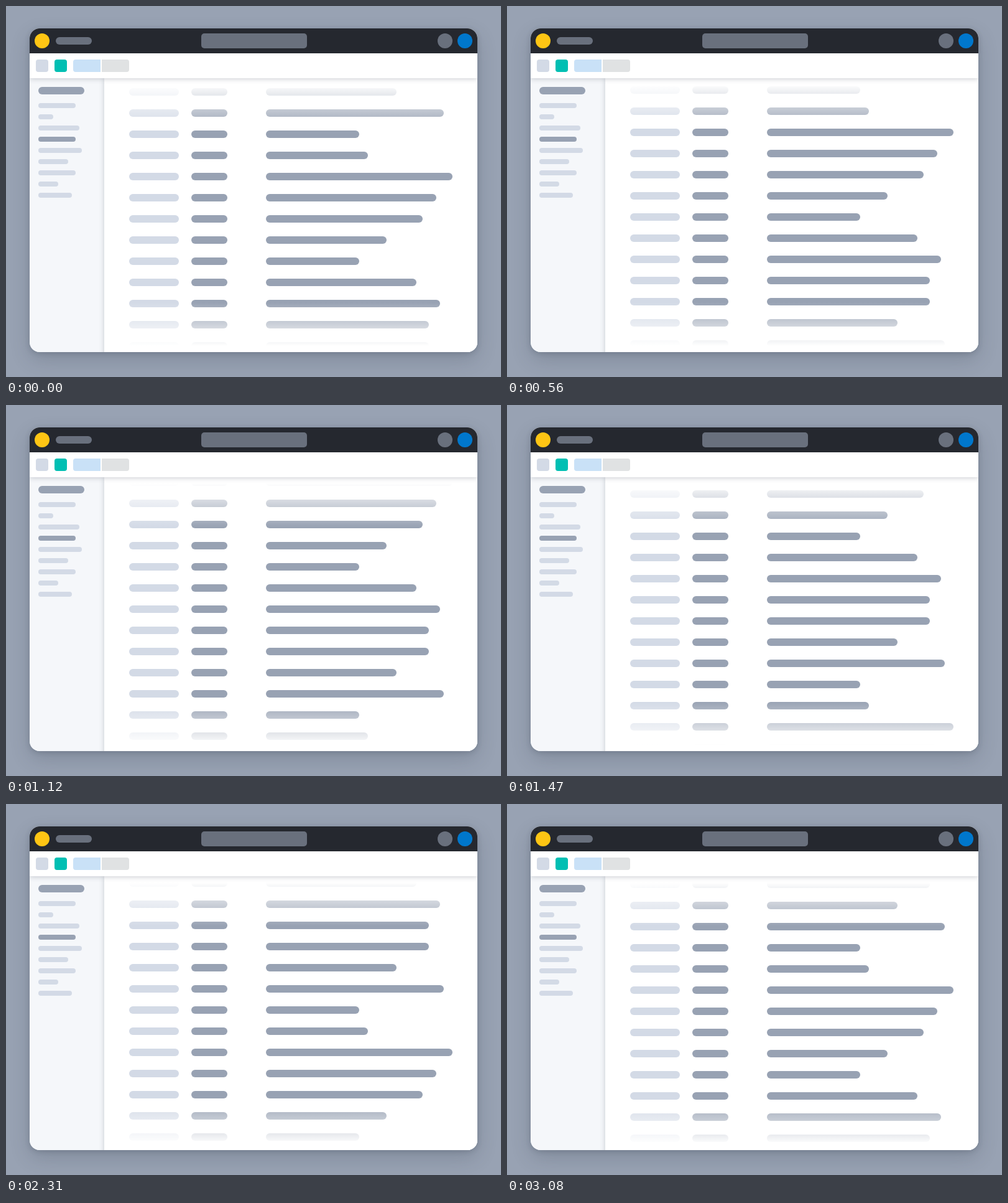
Write an HTML page with a canvas that moves like this. It is 796 by 596 pixels and loops after 3150 ms.

```html
<!DOCTYPE html>
<html lang="en">
<head>
<meta charset="utf-8">
<title>Scrolling log list</title>
<style>
  html, body { margin: 0; width: 100%; height: 100%; overflow: hidden; background: #98a2b3; }
  canvas { display: block; }
</style>
</head>
<body>
<canvas id="stage" width="796" height="596"></canvas>
<script>
const ctx = document.getElementById('stage').getContext('2d');

const LOOP = 3150, STEP = 70;
const ROW_GAP = 34, FIRST_ROW = 132;
const SPEED = 0.1404, RAMP = 107, SCROLL_TIME = 3080;
const ROWS = [210, 286, 150, 164, 300, 274, 252, 194, 150, 242, 280, 262, 262];
const NAV = [60, 24, 66, 60, 70, 48, 60, 32, 54];
const MID = '#98a2b3', LIGHT = '#d3dae6', GREY = '#69707d';

function box(x, y, w, h, r, color) {
  ctx.fillStyle = color;
  ctx.beginPath();
  ctx.roundRect(x, y, w, h, r);
  ctx.fill();
}

const pill = (x, y, w, h, color) => box(x, y, w, h, h / 2, color);
const dot = (x, y, r, color) => pill(x - r, y - r, 2 * r, 2 * r, color);

function shadowed(color, blur, dy, draw) {
  ctx.save();
  ctx.shadowColor = color;
  ctx.shadowBlur = blur;
  ctx.shadowOffsetY = dy;
  draw();
  ctx.restore();
}

// White veil, opaque at y0 and clear at y1
function fade(y0, y1) {
  const g = ctx.createLinearGradient(0, y0, 0, y1);
  g.addColorStop(0, '#fff');
  g.addColorStop(1, 'rgba(255,255,255,0)');
  ctx.fillStyle = g;
  const top = y0 < y1 ? 116 : y1;
  const bottom = y0 < y1 ? y1 : 556;
  ctx.fillRect(159, top, 599, bottom - top);
}

// Constant speed with a short ramp at both ends
function scrollAt(t) {
  const ramp = d => SPEED * d * d / (2 * RAMP);
  if (t < RAMP) return ramp(t);
  if (t > SCROLL_TIME - RAMP) return SPEED * (SCROLL_TIME - RAMP) - ramp(SCROLL_TIME - t);
  return SPEED * (t - RAMP / 2);
}

function drawList(scroll) {
  for (let i = 0; i < 2 * ROWS.length; i++) {
    const y = FIRST_ROW + i * ROW_GAP - scroll;
    if (y < 100 || y > 556) continue;
    pill(198, y, 80, 12, LIGHT);
    pill(298, y, 58, 12, MID);
    pill(418, y, ROWS[i % ROWS.length], 12, MID);
  }
  fade(126, 196);
  fade(546, 476);
}

function drawNav() {
  pill(52, 130, 74, 12, MID);
  NAV.forEach((w, i) => pill(52, 156 + 18 * i, w, 8, i === 3 ? MID : LIGHT));
}

function drawBars() {
  shadowed('rgba(60,70,85,.28)', 8, 1, () => box(38, 76, 720, 40, 0, '#fff'));
  box(48, 86, 20, 20, 4, LIGHT);
  box(78, 86, 20, 20, 4, '#00bfb3');
  box(108, 86, 44, 20, [4, 0, 0, 4], '#c9e1f7');
  box(154, 86, 44, 20, [0, 4, 4, 0], '#e0e2e3');

  box(38, 36, 720, 40, 0, '#25282f');
  dot(58, 56, 12, '#fec514');
  pill(80, 50, 58, 12, GREY);
  box(314, 44, 170, 24, 5, GREY);
  dot(706, 56, 12, GREY);
  dot(738, 56, 12, '#0077cc');
}

function draw(t) {
  const panel = () => box(38, 36, 720, 520, 16, '#f5f7fa');
  box(0, 0, 796, 596, 0, MID);
  shadowed('rgba(40,50,65,.2)', 32, 12, panel);
  shadowed('rgba(40,50,65,.2)', 8, 2, panel);

  ctx.save();
  ctx.beginPath();
  ctx.roundRect(38, 36, 720, 520, 16);
  ctx.clip();
  shadowed('rgba(60,70,85,.25)', 8, 0, () => box(158, 116, 620, 460, 0, '#fff'));
  drawList(Math.round(scrollAt(t)));
  drawNav();
  drawBars();
  ctx.restore();
}

const start = performance.now();
function tick() {
  const t = (performance.now() - start) % LOOP;
  draw(Math.floor(t / STEP) * STEP);
  requestAnimationFrame(tick);
}
tick();
</script>
</body>
</html>
```
